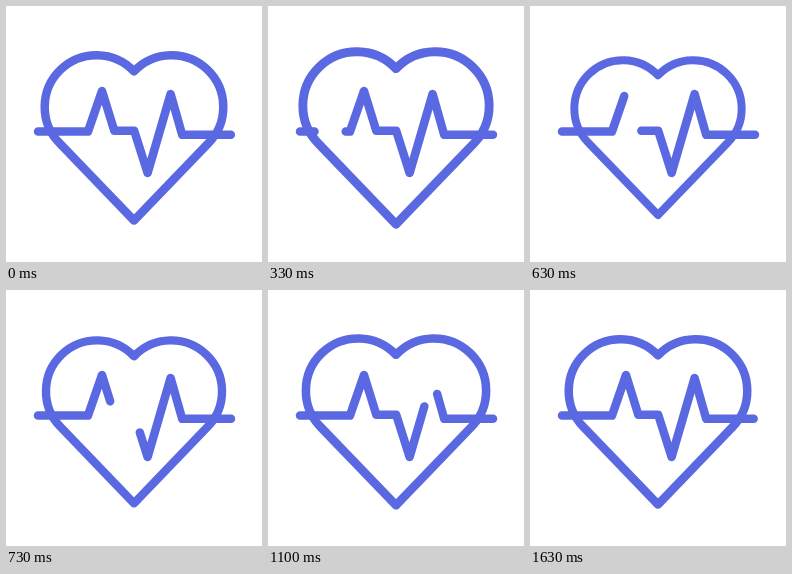
An HTML page that plays this animation: 256 by 256 pixels, repeating every 1.67 s.

```html
<!DOCTYPE html>
<html lang="en">
<head>
<meta charset="utf-8">
<title>Heartbeat</title>
<style>
  html, body { margin: 0; width: 100%; height: 100%; overflow: hidden; background: #fff; }
  svg { display: block; width: 100%; height: 100%; }
  path {
    fill: none; stroke: #5a69e1; stroke-width: 8.5;
    stroke-linecap: round; stroke-linejoin: round;
  }
</style>
</head>
<body>
<svg viewBox="0 0 256 256">
  <path id="heart" d="M128 65.4A51.7 51.7 0 1 0 53.7 137.3L128 214.5L202.3 137.3A51.7 51.7 0 1 0 128 65.4Z"/>
  <path id="trace" pathLength="1" d="M32 125.5H82L96 85L108.3 124.7H128.2L141.6 167L164.6 88L176.2 128.8H225"/>
</svg>
<script>
const LOOP = 1670, TICK = 1000 / 30;
const BEAT = 7.2, LEAD_IN = 1.9;                           // in ticks
const EXTREMES = [1.019, .91, 1.095, .933, 1.153, 1];      // heart size, one beat apart
const SWEEP = 46;

const heart = document.getElementById('heart');
const trace = document.getElementById('trace');

const smooth = x => {
  const t = Math.min(1, Math.max(0, x));
  return t * t * (3 - 2 * t);
};

function heartSize(tick) {
  const beat = (tick + LEAD_IN) / BEAT;
  const i = Math.min(Math.floor(beat), EXTREMES.length - 2);
  return EXTREMES[i] + (EXTREMES[i + 1] - EXTREMES[i]) * smooth(beat - i);
}

// One dash runs from the gap's front, wraps past the end, and stops at the gap's back.
function cutGap(back, front) {
  const gap = front - back + .0005;
  trace.style.strokeDasharray = `${1 - gap} ${gap}`;
  trace.style.strokeDashoffset = -front;
}

function render(ms) {
  const tick = Math.floor((ms % LOOP) / TICK + .15);
  heart.setAttribute('transform', `translate(128 128) scale(${heartSize(tick)}) translate(-128 -128)`);
  cutGap(smooth((tick - 4.5) / SWEEP), smooth((tick + .2) / (SWEEP + .6)));
}

let start;
function loop(now) {
  start ??= now;
  render(now - start);
  requestAnimationFrame(loop);
}
render(0);
requestAnimationFrame(loop);
</script>
</body>
</html>
```
